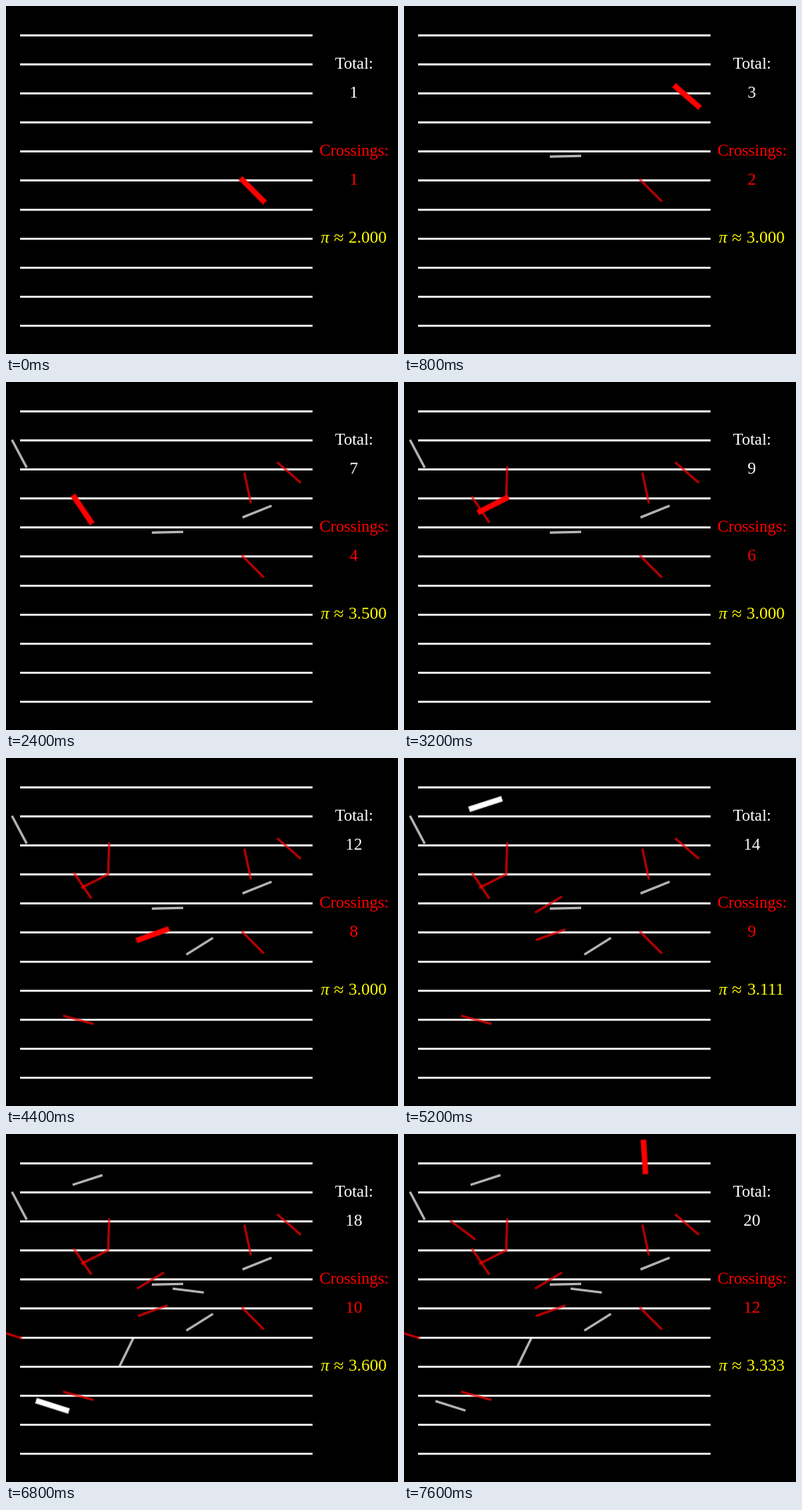
An HTML page with a canvas that plays this animation: 500x444 px, repeating every 8000 ms.

```html
<!DOCTYPE html>
<html lang="en">
<head>
<meta charset="utf-8">
<title>Buffon's needle</title>
<style>
html, body { margin: 0; height: 100%; background: #000; overflow: hidden; }
canvas { display: block; }
</style>
</head>
<body>
<canvas width="500" height="444"></canvas>
<script>
const ctx = document.querySelector("canvas").getContext("2d");
const TOP = 37.54, GAP = 37.04, STEP = 400;
const RED = "#f00", WHITE = "#fff", YELLOW = "#ff0";

// The random throws: centre x, centre y, angle in degrees
const throws = [
  [314.7, 235.2, 45], [206, 191.7, -1.3], [361, 115.5, 41], [308.2, 135.2, 78],
  [17, 91.5, 62], [320.2, 165.3, -22], [97.7, 162.7, 56], [131, 127.6, 92],
  [113.7, 156.8, -27], [247, 240.2, -32], [92.2, 334, 15], [187.2, 225.4, -20],
  [184.3, 187, -31], [104, 58.7, -18], [232.5, 199.7, 7], [153.4, 278.8, -64],
  [1.5, 254.8, 17], [59.3, 346.8, 17.5], [75, 122.5, 37], [306.7, 29.3, 86.5]
];

const row = y => Math.floor((y - TOP) / GAP);

// A needle is as long as the gap; it crosses if its ends lie in different rows.
const needles = throws.map(([x, y, deg]) => {
  const a = deg * Math.PI / 180;
  const dx = Math.cos(a) * GAP / 2, dy = Math.sin(a) * GAP / 2;
  return { ends: [x - dx, y - dy, x + dx, y + dy], crosses: row(y - dy) !== row(y + dy) };
});

function line([x1, y1, x2, y2], width, color, alpha = 1) {
  ctx.globalAlpha = alpha;
  ctx.strokeStyle = color;
  ctx.lineWidth = width;
  ctx.beginPath();
  ctx.moveTo(x1, y1);
  ctx.lineTo(x2, y2);
  ctx.stroke();
  ctx.globalAlpha = 1;
}

function drawNeedle({ ends, crosses }, latest) {
  const color = crosses ? RED : WHITE;
  line(ends, latest ? 7.6 : 3, color, 0.7);
  if (latest) line(ends, 5.7, color);
}

function text(s, x, y, color, size = 21, style = "") {
  ctx.font = `${style} ${size}px 'Liberation Serif', 'Times New Roman', serif`;
  ctx.fillStyle = color;
  ctx.fillText(s, x, y);
}

function render(count) {
  const thrown = needles.slice(0, count);
  const hits = thrown.filter(n => n.crosses).length;
  ctx.fillStyle = "#000";
  ctx.fillRect(0, 0, 500, 444);

  ctx.lineCap = "butt";
  for (let i = 0; i <= 10; i++) {
    const y = Math.round(2 * (TOP + i * GAP)) / 2;
    line([18, y, 391, y], 2.4, WHITE);
  }
  ctx.lineCap = "square";
  thrown.forEach((n, i) => drawNeedle(n, i === count - 1));

  ctx.textAlign = "center";
  text("Total:", 444, 80, WHITE);
  text(count, 443.7, 117, WHITE, 21.5);
  text("Crossings:", 444, 191, RED);
  text(hits, 443.7, 228, RED, 21.5);
  text("π", 407, 302, YELLOW, 21.5, "italic");
  text("≈", 424.5, 303, YELLOW, 23);
  text((2 * count / hits).toFixed(3), 461.3, 302, YELLOW, 21.5);
}

function tick() {
  render(1 + Math.floor(performance.now() / STEP) % needles.length);
  requestAnimationFrame(tick);
}
tick();
</script>
</body>
</html>
```
